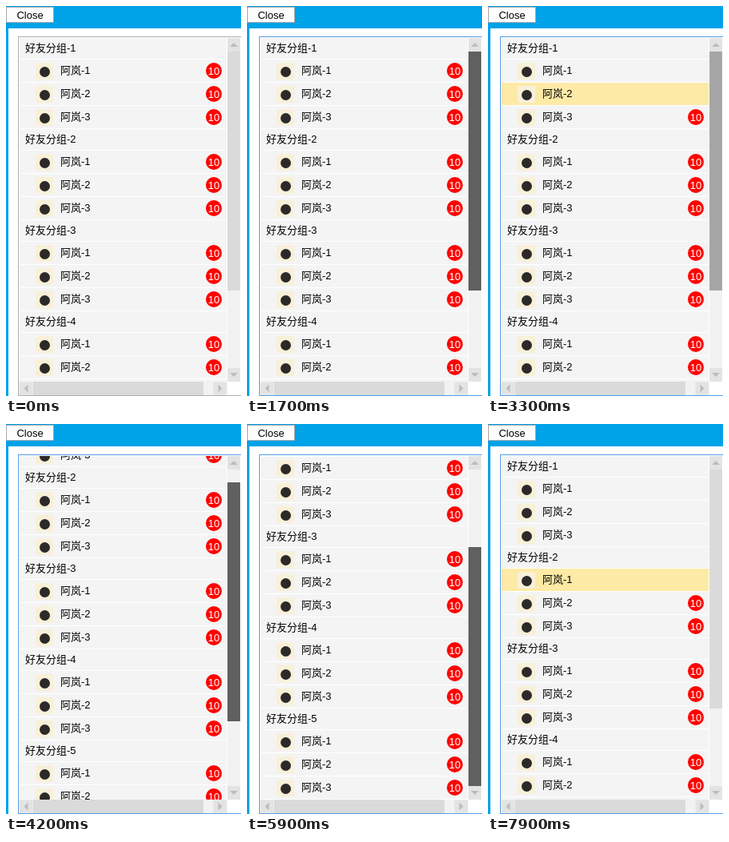
Write an HTML page that moves like this. It is 294 by 488 pixels and loops after 8400 ms.

```html
<!DOCTYPE html>
<html lang="zh">
<head>
<meta charset="utf-8">
<title>好友列表</title>
<style>
  html, body { margin: 0; width: 100%; height: 100%; overflow: hidden; }
  body {
    position: relative; background: #00a2e8; color: #000;
    font: 13px/1 "Liberation Sans", "Noto Sans CJK SC", "Noto Sans CJK", sans-serif;
  }
  body * { position: absolute; box-sizing: border-box; white-space: nowrap; }
  .close {
    left: 0; top: 1px; width: 60px; height: 20px;
    background: #fdfdfd; border: 1px solid #a3a8ab;
    line-height: 20px; text-align: center;
  }
  .panel { left: 3px; top: 28px; width: 291px; height: 460px; background: #fff; }
  .box {
    left: 15px; top: 38px; width: 300px; height: 450px;
    background: #fff; border: 1px solid #abadb3;
  }
  .box.focus { border-color: #569de5; }
  .view { left: 17px; top: 40px; width: 259px; height: 430px; overflow: hidden; }
  .list { left: 0; top: 0; width: 259px; }
  .head, .row { left: 0; width: 259px; background: #f4f4f4; }
  .head { height: 26px; padding-left: 7px; line-height: 26px; }
  .row { height: 28px; }
  .row.hover { background: #fef5b8; }
  .row.picked { background: #fdeaa6; }
  .face { left: 20px; top: 4px; width: 22px; height: 21px; background: #f8f0d8; border-radius: 2px; }
  .face::after {
    content: ""; position: absolute; left: 5px; top: 5px;
    width: 13px; height: 13px; border-radius: 50%; background: #2c2929;
  }
  .name { left: 51px; top: 0; line-height: 28px; }
  .badge {
    left: 233px; top: 4px; width: 20px; height: 20px; border-radius: 50%;
    background: #f00; color: #fff; line-height: 21px; text-align: center;
  }
  .read .badge { display: none; }
  .track { background: #f2f2f2; }
  .v { left: 277px; top: 40px; width: 16px; height: 430px; }
  .h { left: 17px; top: 470px; width: 259px; height: 17px; }
  .thumb { background: #dadada; }
  .v .thumb { left: 0; top: 17px; width: 16px; height: 299px; }
  .h .thumb { left: 17px; top: 0; width: 213px; height: 17px; }
  .arrow { width: 16px; height: 17px; background: #e3e3e3; }
  .arrow::after {
    content: ""; position: absolute; left: 3px; top: 6px;
    border: 5px solid transparent; border-top: 0; border-bottom: 5px solid #bdbdbd;
  }
  .down { transform: rotate(180deg); }
  .left { transform: rotate(-90deg); }
  .right { transform: rotate(90deg); }
</style>
</head>
<body>
<div class="close">Close</div>
<div class="panel"></div>
<div class="box" id="box"></div>
<div class="view"><div class="list" id="list"></div></div>
<div class="track v">
  <div class="arrow" style="top:0"></div>
  <div class="thumb" id="thumb"></div>
  <div class="arrow down" style="bottom:0"></div>
</div>
<div class="track h">
  <div class="arrow left" style="left:0"></div>
  <div class="thumb"></div>
  <div class="arrow right" style="right:0"></div>
</div>
<script>
const LOOP = 8400;
const GROUPS = 5, GROUP_H = 114, HEAD_H = 27, ROW_H = 29;
const RATIO = 140 / 97; // list pixels per thumb pixel
const IDLE = '#dadada', OVER = '#a6a6a6', DOWN = '#606060';
const $ = id => document.getElementById(id);
const box = $('box'), list = $('list'), thumb = $('thumb');

function add(parent, cls, text = '', top) {
  const el = document.createElement('div');
  el.className = cls;
  el.textContent = text;
  if (top !== undefined) el.style.top = top + 'px';
  parent.append(el);
  return el;
}

const rows = [];
for (let g = 0; g < GROUPS; g++) {
  add(list, 'head', `好友分组-${g + 1}`, g * GROUP_H);
  for (let i = 0; i < 3; i++) {
    const row = add(list, 'row', '', g * GROUP_H + HEAD_H + i * ROW_H);
    add(row, 'face');
    add(row, 'name', `阿岚-${i + 1}`);
    add(row, 'badge', '10');
    rows.push(row);
  }
}

// y: thumb travel, lag: travel the list still shows while dragging
const at = (t, change) => ({ t, ...change });
const drag = (t, y, lag = y) => at(t, { bar: DOWN, y, lag });
const hover = (t, row, bar = IDLE) => at(t, { hover: row, bar });
const pick = (t, row) => at(t, { picked: row, hover: -1 });

const cues = [
  hover(300, -1, OVER),
  { ...drag(900, 0), focus: true },
  drag(1000, 26, 12), drag(1100, 68, 40), drag(1200, 97),
  drag(1600, 30, 60), drag(1700, 0),
  hover(1900, -1, OVER), hover(2000, 0),
  pick(2200, 0), hover(2700, 1), pick(2900, 1),
  hover(3300, -1, OVER),
  drag(3500, 8, 0), drag(3600, 36, 12), drag(3700, 72, 40), drag(3800, 97),
  drag(4000, 88, 97), drag(4100, 69, 88), drag(4200, 16, 69.3), drag(4300, 0),
  hover(4600, -1, OVER), hover(4700, -1, '#c4c4c4'), hover(4800, -1),
  pick(5000, 2), hover(5300, 1),
  hover(5500, -1, OVER),
  drag(5700, 24, 10), drag(5800, 70, 40), drag(5900, 97),
  drag(6400, 34, 62), drag(6500, 0),
  hover(6900, 0), hover(7000, -1),
  hover(7200, 3), pick(7300, 3),
  hover(7800, 1), hover(7900, -1)
];

function draw(now) {
  const t = now % LOOP;
  const s = { bar: IDLE, y: 0, lag: 0, focus: false, hover: -1, picked: -1 };
  const read = new Set();
  for (const cue of cues) {
    if (cue.t > t) break;
    Object.assign(s, cue);
    read.add(s.picked);
  }
  box.classList.toggle('focus', s.focus);
  thumb.style.background = s.bar;
  thumb.style.transform = `translateY(${s.y}px)`;
  list.style.transform = `translateY(${-Math.round(s.lag * RATIO)}px)`;
  rows.forEach((row, i) => {
    row.classList.toggle('hover', i === s.hover);
    row.classList.toggle('picked', i === s.picked);
    row.classList.toggle('read', read.has(i));
  });
}

const start = performance.now();
function tick() {
  draw(performance.now() - start);
  requestAnimationFrame(tick);
}
tick();
</script>
</body>
</html>
```
